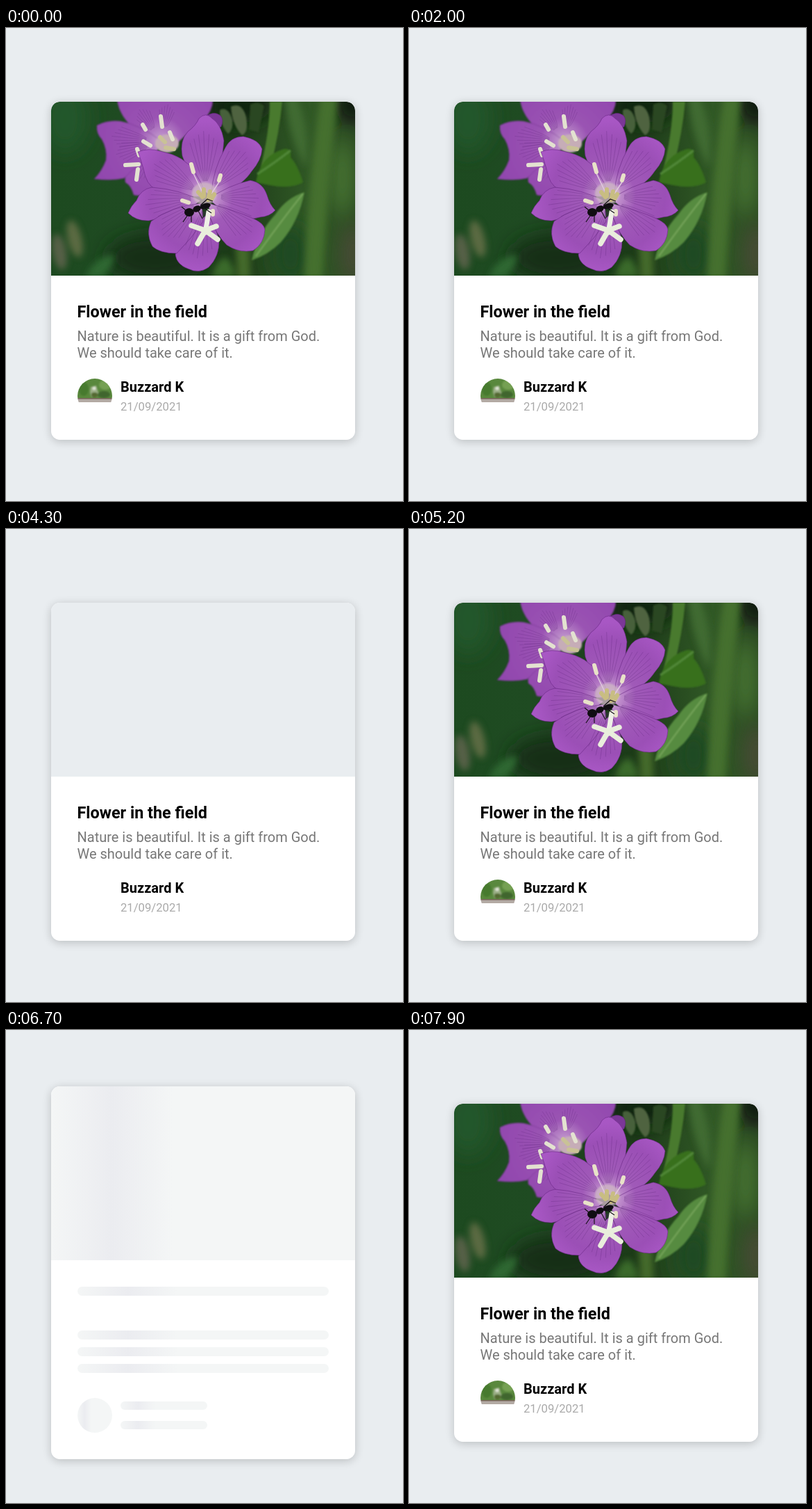
An HTML page for the animation above (8 s loop, 572 by 680 pixels).

```html
<!DOCTYPE html>
<html lang="en">
<head>
<meta charset="utf-8">
<title>Card loading skeleton</title>
<style>
  html, body { margin: 0; width: 100%; height: 100%; overflow: hidden; background: #e9edf0; }
  .card {
    position: absolute; left: 65px; width: 438px;
    background: #fff; border-radius: 12.5px; overflow: hidden;
    box-shadow: 0 2.5px 12.5px rgba(0, 0, 0, .2);
    animation: 8s step-end infinite;
  }
  .loaded { top: 106px; height: 486px; animation-name: loaded; }
  .loading { top: 81px; height: 536px; opacity: 0; animation-name: loading; }
  .loaded svg { display: block; }
  .late { animation: late 8s step-end infinite; }
  text { font-family: Roboto, Arial, sans-serif; }
  .bold { font-weight: 700; fill: #000; }

  .loading i {
    position: absolute; border-radius: 25px;
    background: linear-gradient(to right, #f4f6f6 0%, #ebecf0 10%, #f4f6f6 20%, #f4f6f6 100%) 100% 0 / 200% 100%;
    animation: shimmer 8s step-end infinite;
  }
  .loading .hero { left: 0; top: 0; width: 438px; height: 250px; border-radius: 0; }
  .loading .line { left: 38px; width: 362px; height: 12.5px; }
  .loading .face { left: 38px; top: 448px; width: 50px; height: 50px; }
  .loading .name { left: 100px; width: 125px; height: 12.5px; }

  @keyframes loaded {
    0%, 53.75%, 93.75% { opacity: 1; }
    27.5%, 68.75% { opacity: 0; }
    100% { opacity: 1; }
  }
  @keyframes loading {
    0%, 53.75%, 93.75% { opacity: 0; }
    27.5%, 68.75% { opacity: 1; }
    100% { opacity: 0; }
  }
  @keyframes late {
    0%, 55%, 100% { opacity: 1; }
    53.75% { opacity: 0; }
  }
  @keyframes shimmer {
    0%, 100% { background-position: 100% 0; }
    68.75% { background-position: 0 0; }
  }
</style>
</head>
<body>
<div class="card loaded">
<svg width="438" height="486" viewBox="65 106 438 486">
  <defs>
    <clipPath id="frame"><rect x="65" y="106" width="438" height="250"/></clipPath>
    <clipPath id="round"><circle cx="128" cy="529" r="25"/></clipPath>
    <filter id="soft" x="-50%" y="-50%" width="200%" height="200%"><feGaussianBlur stdDeviation="5"/></filter>
    <filter id="haze" x="-50%" y="-50%" width="200%" height="200%"><feGaussianBlur stdDeviation="14"/></filter>
    <filter id="tiny"><feGaussianBlur stdDeviation=".9"/></filter>
    <linearGradient id="field">
      <stop offset="0" stop-color="#1d4a20"/>
      <stop offset=".25" stop-color="#1f4b22"/>
      <stop offset=".6" stop-color="#1c3a18"/>
      <stop offset=".85" stop-color="#315926"/>
      <stop offset="1" stop-color="#2b4a22"/>
    </linearGradient>
    <radialGradient id="front" gradientUnits="userSpaceOnUse" cx="288" cy="242" r="108">
      <stop offset="0" stop-color="#d9c4dc"/>
      <stop offset=".16" stop-color="#bd8bca"/>
      <stop offset=".36" stop-color="#a05ab8"/>
      <stop offset=".75" stop-color="#9b4fb6"/>
      <stop offset="1" stop-color="#a857c4"/>
    </radialGradient>
    <radialGradient id="back" gradientUnits="userSpaceOnUse" cx="224" cy="163" r="100">
      <stop offset="0" stop-color="#c9a5d2"/>
      <stop offset=".35" stop-color="#9a53b3"/>
      <stop offset="1" stop-color="#9147ae"/>
    </radialGradient>
  </defs>

  <rect x="65" y="106" width="438" height="250" fill="#e9edf0"/>
  <g class="late" clip-path="url(#frame)">
    <rect x="65" y="106" width="438" height="250" fill="url(#field)"/>
    <g filter="url(#haze)">
      <ellipse cx="215" cy="330" rx="70" ry="34" fill="#122e17"/>
      <ellipse cx="85" cy="130" rx="34" ry="50" fill="#24562a"/>
      <ellipse cx="335" cy="112" rx="50" ry="24" fill="#0f210d"/>
      <ellipse cx="500" cy="108" rx="26" ry="32" fill="#0c160b"/>
      <ellipse cx="410" cy="325" rx="26" ry="42" fill="#1b4a20"/>
      <ellipse cx="500" cy="325" rx="16" ry="44" fill="#4b4c38"/>
      <ellipse cx="485" cy="215" rx="16" ry="55" fill="#477433"/>
    </g>
    <g filter="url(#soft)">
      <path d="M452 100L478 100Q464 220 456 360L430 360Q436 220 452 100Z" fill="#456f2d"/>
      <path d="M402 100L420 100Q440 150 432 200Q408 160 402 100Z" fill="#3f6b30"/>
      <path d="M330 300L350 300L352 360L334 360Z" fill="#456a2a"/>
      <ellipse cx="99" cy="303" rx="10" ry="27" fill="#5b6b42" transform="rotate(-14 99 303)"/>
      <ellipse cx="77" cy="322" rx="10" ry="26" fill="#566047" transform="rotate(-10 77 322)"/>
      <path d="M115 358Q128 328 156 326Q154 346 138 358Z" fill="#2f6830"/>
      <path d="M296 358Q304 330 318 330Q330 344 330 358Z" fill="#3a6a2c"/>
    </g>
    <g filter="url(#tiny)">
      <path d="M380 106L398 106Q394 150 382 196L366 204Q380 150 380 106Z" fill="#4a7a2d"/>
      <path d="M324 113Q340 106 346 128Q350 150 340 154Q326 140 324 113Z" fill="#4f6440"/>
      <path d="M308 118Q320 112 326 132Q328 146 320 152Q308 140 308 118Z" fill="#47603a"/>
      <path d="M352 110Q362 104 372 112L364 150L350 146Z" fill="#2b4721"/>
      <path d="M360 222Q366 184 400 174Q412 172 410 186Q420 196 428 222Q410 232 380 226Z" fill="#38701f"/>
      <path d="M362 210Q384 196 410 176" fill="none" stroke="#518837" stroke-width="3"/>
      <path d="M430 236Q422 278 396 308Q378 326 354 334Q362 296 388 268Q404 244 430 236Z" fill="#568b40"/>
      <path d="M428 238Q396 278 360 328" fill="none" stroke="#78a75c" stroke-width="2"/>
    </g>

    <g fill="url(#back)" stroke="#652681" stroke-opacity=".45" filter="url(#tiny)">
      <path d="M160 104Q164 128 186 146Q208 165 244 168Q262 150 284 134Q298 118 298 104Z"/>
      <path d="M172 222Q168 202 194 180L216 178Q228 210 212 230Q198 244 184 240Q180 226 172 222Z"/>
      <path d="M131 140Q146 132 165 134Q196 140 224 163Q218 184 198 190Q180 206 170 216Q152 220 127 217Q138 206 144 190Q146 174 138 160Q130 152 131 140Z"/>
    </g>
    <g id="backVeins" stroke="#5d2479" stroke-opacity=".3" stroke-width=".8" fill="none"></g>
    <ellipse cx="232" cy="166" rx="17" ry="13" fill="#c6adb7" filter="url(#tiny)"/>
    <g stroke="#e3e2d0" stroke-width="6" stroke-linecap="round" fill="none">
      <path d="M223 127L225 142M197 139L201 146M236 150L240 160M198 163L208 169M189 174L192 183M172 197L191 196M190 203L188 218"/>
      <path d="M222 157L229 164M230 172L242 174" stroke="#c9c296"/>
    </g>

    <g fill="url(#front)" stroke="#642480" stroke-opacity=".55">
      <path d="M286 128Q300 118 309 126Q314 132 310 142L296 146Z" fill="#7b3797"/>
      <path d="M290 238Q262 208 254 184Q250 162 262 149Q274 140 278 130Q288 120 297 130Q310 138 314 162Q312 190 301 236Z"/>
      <path d="M296 238Q298 204 316 172Q324 156 342 156Q364 160 369 174Q368 190 354 206Q344 222 316 238Z"/>
      <path d="M282 242Q246 244 216 232Q202 226 198 202Q194 188 190 178Q206 172 222 177Q258 184 272 207Q282 222 288 240Z"/>
      <path d="M280 248Q250 232 210 229Q194 232 188 248Q180 256 176 266Q188 278 206 277Q234 272 270 256Z"/>
      <path d="M292 246Q320 226 352 219Q370 222 376 240Q380 254 388 262Q380 271 366 272Q348 278 318 268Z"/>
      <path d="M276 280Q250 300 244 326Q246 340 262 346Q278 354 292 344Q308 328 307 304Q300 280 290 268Z"/>
      <path d="M282 252Q238 256 209 278Q201 296 211 314Q222 324 246 324Q268 302 284 278Z"/>
      <path d="M292 252Q334 264 352 272Q372 280 373 290Q372 310 356 320Q336 324 318 312Q302 296 294 272Z"/>
    </g>
    <g id="veins" stroke="#5d2479" stroke-opacity=".36" stroke-width=".8" fill="none"></g>
    <ellipse cx="286" cy="238" rx="18" ry="16" fill="#cdb5c4" opacity=".8" filter="url(#tiny)"/>
    <g stroke-linecap="round" fill="none">
      <path d="M269 207L282 234M308 220L296 238" stroke="#e1c9e0" stroke-width="1.5"/>
      <path d="M277 236L283 243M285 232L285 242M294 235L291 247M300 239L296 246" stroke="#c8bd82" stroke-width="6"/>
      <path d="M267 196L270 207M309 212L307 219M254 248L263 251M298 263L298 268" stroke="#e8e2c8" stroke-width="6"/>
      <path d="M292 264Q290 278 287 294" stroke="#eef0e6" stroke-width="7"/>
      <path d="M267 284L287 291L303 285M287 291L276 310M287 291L305 304" stroke="#e9eedc" stroke-width="7.5"/>
    </g>
    <g fill="#100d12">
      <ellipse cx="264" cy="265" rx="7" ry="6"/>
      <ellipse cx="275" cy="260" rx="6" ry="4.5" transform="rotate(-25 275 260)"/>
      <ellipse cx="287" cy="256" rx="8" ry="4" transform="rotate(-16 287 256)"/>
      <path d="M259 262L253 257M261 270L255 279M267 270L267 279M277 263L283 274M284 258L296 266M280 255L290 246L298 249" fill="none" stroke="#18131a" stroke-width="1.2"/>
    </g>
  </g>

  <g class="late" clip-path="url(#round)">
    <rect x="103" y="504" width="50" height="34" fill="#59883d"/>
    <g filter="url(#tiny)">
      <ellipse cx="112" cy="519" rx="7" ry="10" fill="#477a2f"/>
      <ellipse cx="143" cy="513" rx="9" ry="7" fill="#75a052"/>
      <ellipse cx="141" cy="527" rx="9" ry="5" fill="#40662f"/>
      <path d="M122 516L130 514L133 524L131 531L123 531L121 523Z" fill="#9baf87"/>
      <circle cx="127" cy="518" r="2.5" fill="#dfe5d6"/>
      <rect x="123" y="524" width="9" height="7" rx="3" fill="#556b32"/>
    </g>
    <rect x="103" y="532" width="50" height="6" fill="#b3aaa4"/>
    <rect x="103" y="532" width="50" height="1.5" fill="#776558"/>
  </g>

  <text class="bold" x="102.5" y="416" font-size="23.4">Flower in the field</text>
  <g font-size="20" fill="#777">
    <text x="102.5" y="450">Nature is beautiful. It is a gift from God.</text>
    <text x="102.5" y="474">We should take care of it.</text>
  </g>
  <text class="bold" x="165" y="523" font-size="20">Buzzard K</text>
  <text x="165" y="550" font-size="16.67" fill="#aaa">21/09/2021</text>
</svg>
</div>

<div class="card loading">
  <i class="hero"></i>
  <i class="line" style="top:288px"></i>
  <i class="line" style="top:351px"></i>
  <i class="line" style="top:375px"></i>
  <i class="line" style="top:399px"></i>
  <i class="face"></i>
  <i class="name" style="top:452.5px"></i>
  <i class="name" style="top:480.5px"></i>
</div>

<script>
  // Fans of fine veins running out from a flower's centre along each petal.
  function drawVeins(id, cx, cy, petals, spread) {
    let d = "";
    for (const [deg, len] of petals) {
      for (let k = -3; k <= 3; k++) {
        const a = deg * Math.PI / 180, b = a + k * spread;
        const r = len * (1 - .05 * Math.abs(k));
        const at = (angle, dist) =>
          (cx + dist * Math.cos(angle)).toFixed(1) + " " + (cy + dist * Math.sin(angle)).toFixed(1);
        d += `M${at(a + k * spread * .5, 22)}Q${at(b, r * .5)} ${at(b, r)}`;
      }
    }
    const path = document.createElementNS("http://www.w3.org/2000/svg", "path");
    path.setAttribute("d", d);
    document.getElementById(id).append(path);
  }
  drawVeins("veins", 288, 242,
    [[-92, 94], [-48, 86], [2, 76], [38, 84], [98, 90], [138, 84], [172, 88], [212, 88]], .085);
  drawVeins("backVeins", 224, 163, [[-80, 54], [-125, 56], [186, 72], [164, 68], [120, 62]], .08);
</script>
</body>
</html>
```
